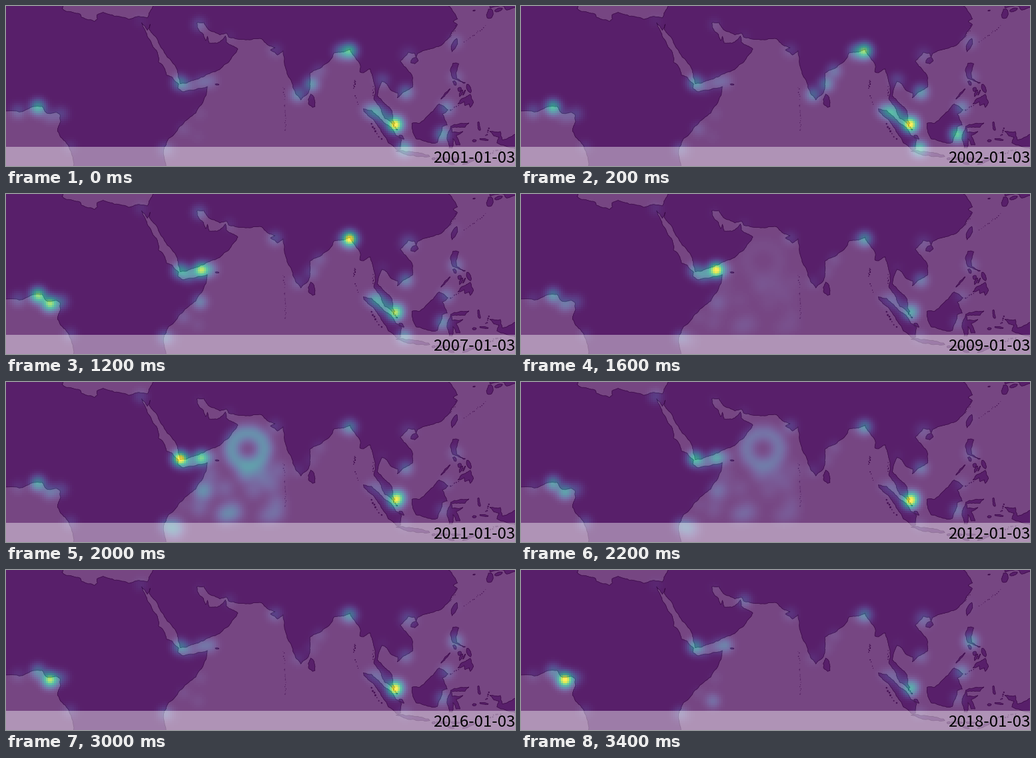
These frames come from a looping animation (764x242 px, 3600 ms). A matplotlib script:

```python
import numpy as np
import matplotlib.pyplot as plt
from matplotlib.animation import FuncAnimation
from matplotlib.patches import Polygon, Rectangle

W, H, DPI = 764, 242, 100
CELL = 3
START, YEARS = 2001, 18
OVERLAY = 0.733
LAND = (143 / 255, 113 / 255, 165 / 255)
rng = np.random.default_rng(4)

fig = plt.figure(figsize=(W / DPI, H / DPI), dpi=DPI, facecolor="white")
ax = fig.add_axes([0, 0, 1, 1])
ax.axis("off")


def px(size):
    return 72 / DPI * size


def project(lonlat):
    return np.column_stack([30.5 + 5.31 * lonlat[:, 0], 185.5 - 5.35 * lonlat[:, 1]])


def roughen(p, depth=3):
    """Split each side and push the midpoints sideways for a natural coast."""
    for _ in range(depth):
        q = np.roll(p, -1, axis=0)
        d = q - p
        push = np.column_stack([-d[:, 1], d[:, 0]]) * rng.uniform(-0.1, 0.1, (len(p), 1))
        mid = (p + q) / 2 + np.clip(push, -0.15, 0.15)
        p = np.stack([p, mid], axis=1).reshape(-1, 2)
    return p


def land(*coords):
    """Fill a coastline given as lon, lat, lon, lat, ..."""
    shape = project(roughen(np.reshape(coords, (-1, 2)).astype(float)))
    ax.add_patch(Polygon(shape, facecolor=LAND, edgecolor=(0, 0, 0, 0.85),
                         linewidth=px(0.75), joinstyle="round", zorder=1))


def isle(lon, lat, length, width, angle):
    """An oval island with a ragged shore."""
    a = np.linspace(0, 2 * np.pi, 10, endpoint=False)
    r = rng.uniform(0.8, 1.15, a.size) / 2
    z = (length * r * np.cos(a) + 1j * width * r * np.sin(a)) * np.exp(1j * np.radians(angle))
    land(*np.column_stack([lon + z.real, lat + z.imag]).ravel())


def islets(lon0, lat0, lon1, lat1, count, size=1.2):
    """Scatter tiny islands along a line."""
    p = np.linspace([lon0, lat0], [lon1, lat1], count)
    p = project(p + rng.normal(0, 0.15, p.shape))
    ax.scatter(p[:, 0], p[:, 1], s=px(size) ** 2 * rng.uniform(0.4, 1.6, count),
               color=(0.1, 0.05, 0.15, 0.8), linewidths=0, zorder=1)


# Mainland coast, clockwise from north-west Africa
mediterranean = [
    -8, 40, 10.7, 40, 10.4, 34.6, 10.1, 34, 11.2, 33.2, 13.2, 32.9, 15.2, 32.4,
    15.6, 31.5, 18, 30.8, 19.2, 30.3, 20.1, 31, 20, 32.2, 21.7, 32.9, 23.1, 32.4,
    25, 31.8, 29, 30.9, 31, 31.6, 34.2, 31.3, 35.5, 33.9, 36, 40]
east_asia = [
    119.3, 40, 119.2, 34.8, 120.9, 32.8, 121.9, 31, 120.7, 30.3, 121.8, 29.5,
    119.7, 26, 117.8, 24, 115, 22.7, 113.6, 22.4, 110.6, 21.3, 110.2, 20.3,
    109.7, 21.4, 108, 21.6, 105.7, 19, 107.8, 16.6, 109.2, 14.5, 109.2, 11.8,
    106.8, 10.4, 104.9, 8.7, 105, 10.1, 103.3, 10.7, 101.9, 12.7, 100.5, 13.4]
malay = [
    99.9, 12, 99.2, 9.3, 100.3, 8.3, 101.6, 6.9, 103.4, 4.9, 103.5, 2.6, 104.2, 1.4,
    103.5, 1.3, 101.3, 2.9, 100.3, 5.5, 98.3, 8.2, 98.7, 10.2, 98.1, 13.8,
    97.2, 16.9, 95.4, 15.8, 94.3, 16, 94.4, 18, 92.1, 21.2, 91.5, 22.5]
india = [
    88.9, 21.6, 87, 21.4, 86.4, 20, 82.3, 16.8, 80.2, 15.7, 80.2, 13.3, 79.8, 10.3,
    78.2, 8.9, 77.6, 8.1, 76.4, 9.5, 74.5, 14.2, 73, 18, 72.6, 22, 71, 20.8,
    69, 22.2, 70.3, 22.9, 68.2, 23.7, 66.5, 25.4]
gulf = [
    62, 25.1, 57.3, 25.8, 56.6, 27, 54.7, 26.5, 51.5, 28, 50.2, 30, 48.2, 29.9,
    48.4, 28.5, 50.1, 26.6, 50.7, 24.9, 51.2, 26.1, 51.7, 24.2, 54, 24.2,
    56.3, 26.2, 56.6, 24.4, 59.8, 22.5]
red_sea = [
    57.8, 19.6, 55.3, 17.3, 52.2, 15.8, 48.5, 14, 45, 12.8, 43.5, 12.7, 42.7, 16.5,
    39, 21.5, 37.2, 24.9, 34.7, 28.1, 35, 29.5, 34.2, 27.8, 32.6, 29.9, 33.6, 27.8,
    35.5, 23.8, 37.1, 21.5, 37.4, 18.8, 38.5, 18, 39.7, 15.1, 41.2, 14.6]
africa = [
    43.1, 12.6, 42.8, 11.5, 44.3, 10.4, 48, 11.1, 51.2, 11.9, 50.8, 9.4, 47.9, 4.4,
    44, 1, 40.2, -2.8, 38.8, -6, 40, -14, 13.7, -14, 13.2, -8.5, 11.8, -4.6,
    8.8, -.7, 9.7, 2, 9.5, 4, 8.5, 4.6, 6, 4.3, 4.4, 6.3, 1.2, 6, -2, 4.7, -8, 5]
land(*mediterranean, *east_asia, *malay, *india, *gulf, *red_sea, *africa)

# Sumatra, Borneo, Sulawesi, Luzon, Mindanao, New Guinea, Honshu
land(95.3, 5.6, 97.5, 5.2, 100, 2.8, 103, .5, 104.5, -1.9, 106, -3, 105.8, -5.8,
     104.6, -5.9, 102.3, -4, 100.4, -1, 98.7, 1.7, 95.4, 4.9)
land(109, 1.5, 111.3, 1.6, 113, 3.2, 116.7, 7, 119.2, 5.3, 117.6, 4.1, 119, 1,
     117.6, .6, 116.2, -3.9, 114.6, -4.1, 110.2, -2.9, 109, .2)
land(120, .7, 121, 1.2, 125.1, 1.6, 124, .4, 120.2, .3, 120.3, -1, 123.4, -.8,
     121.5, -2, 122.6, -4.6, 121.5, -4.6, 120.6, -2.8, 120.4, -5.5, 119.5, -5.5,
     118.9, -2.7)
land(120.6, 18.5, 122.2, 18.4, 121.5, 15.8, 121.7, 14.2, 124.1, 13, 123.6, 12.8,
     121.7, 13.8, 120.5, 14.2, 119.9, 16.2)
land(122, 7, 123.4, 8.6, 125.5, 9.7, 126.4, 7.3, 125.5, 6, 125.2, 7, 124, 6.5,
     123.8, 7.6)
land(131, -.8, 134, -.8, 134.6, -3.2, 138, -1.6, 142, -2.6, 142, -9, 139, -8,
     138, -5.5, 133, -4, 133.6, -2.4, 132.2, -2.1)
land(131, 37, 131, 34.2, 135, 34.6, 135.8, 33.5, 138.8, 34.7, 139, 37)

isle(80.7, 7.8, 3.9, 2, 100)        # Sri Lanka
isle(53.9, 12.5, 1.1, .4, 0)        # Socotra
isle(121, 23.6, 3.6, 1.4, 70)       # Taiwan
isle(109.7, 19.2, 2.2, 1.7, 30)     # Hainan
isle(109.8, -7.2, 9.4, 1.2, -9)     # Java
isle(131, 32.4, 2.8, 1.9, 80)       # Kyushu
isle(133.5, 33.6, 2.2, 1, 20)       # Shikoku
isle(126.6, 33.4, .7, .3, 10)       # Jeju
isle(125, 11.4, 2.5, 1.1, 115)      # Samar
isle(122.5, 11.1, 1.3, 1, 50)       # Panay
isle(122.9, 10, 1.9, .7, 65)        # Negros
isle(123.8, 10.3, 1.7, .3, 65)      # Cebu
isle(118.5, 9.8, 3.8, .5, 48)       # Palawan
isle(121.1, 12.9, 1.5, .8, 120)     # Mindoro
isle(127.9, .7, 2.8, .7, 100)       # Halmahera
isle(129.4, -3.1, 2.8, .5, -8)      # Seram
isle(126.6, -3.4, 1.1, .7, 0)       # Buru
isle(106, -2.3, 1.8, .7, -40)       # Bangka
isle(125.3, -9.2, 4, .8, 25)        # Timor
isle(120, -9.8, 1.8, .6, -15)       # Sumba
for lon, length in [(115.1, 1), (116.3, .8), (118, 2), (121.3, 2.8)]:
    isle(lon, -8.5, length, .6, 0)

islets(73.2, 7, 73.2, -.6, 14)
islets(72.6, 11.8, 73, 8.4, 6)
islets(92.9, 13.5, 92.6, 11.6, 8, 1.8)
islets(92.8, 9.2, 93.8, 7, 4, 1.5)
islets(97.5, 1.5, 100.2, -3, 7, 2.4)
islets(123.9, 24.4, 129.8, 29, 12)
islets(103.7, 1, 104.8, -.3, 8, 1.8)
islets(119.8, 5.2, 122, 6.6, 7, 1.6)
islets(127.5, -7.6, 134, -6, 12, 1.8)
islets(130.5, 0, 130, -2, 5, 2.2)
islets(121.5, 29.4, 120, 26, 8)
islets(98, 11.8, 98.2, 9.5, 6, 1.6)

# Hot spots: each has a steady level plus swells around some years
gx, gy = np.meshgrid(np.arange(CELL / 2, W, CELL), np.arange(CELL / 2, H, CELL))
years = START + np.arange(YEARS)[:, None, None]
field = np.zeros((YEARS, *gx.shape))


def bell(t, center, width):
    return np.exp(-((t - center) / width) ** 2 / 2)


def spot(x, y, base, *swells, spread=8):
    """Add a hot spot; a swell is (height, peak year, width in years)."""
    level = base + sum(h * bell(years, year, width) for h, year, width in swells)
    field[:] += level * np.exp(-((gx - x) ** 2 + (gy - y) ** 2) / (2 * spread ** 2))


# Straits and islands of South-East Asia: busy early, again around 2013
spot(584, 180, .28, (.65, 2001.5, 3), (.72, 2014, 2.2))
spot(589, 174, .1, (.35, 2011, .7))
spot(556, 160, .1, (.4, 2003.5, 2.2), (.25, 2005, .7))
spot(568, 169, .1, (.3, 2003.5, 2.2))
spot(545, 158, .04, (.2, 2002.5, 1.8))
spot(655, 194, .08, (.85, 2003.5, 1.6), (.18, 2014, 1.5))
spot(598, 216, .06, (.6, 2003.2, 2.2))
spot(600, 130, .12, (.22, 2002, 1), (.1, 2010, 2))
spot(661, 154, .06, (.18, 2002, 3), (.18, 2018, 1.5))
spot(675, 108, .1, (.24, 2018, 1.5))
spot(604, 74, .08, (.1, 2005, 1), (.08, 2018, 2), spread=9)
spot(565, 112, .02, (.13, 2001.5, 1))
spot(674, 54, .02, (.1, 2001.5, 1))

# Bay of Bengal and India
spot(516, 68, .3, (.58, 2004, 2.5))
spot(502, 69, .03, (.25, 2001.6, 1))
spot(458, 118, .04, (.3, 2000.5, 2.5), (.12, 2005, 1))
spot(438, 134, .05, (.23, 2001.7, 2))
spot(470, 98, .05, (.14, 2002, .6))
spot(404, 67, .08, (.13, 2005, 1), (.12, 2014, 1.2))

# Gulf of Aden and East Africa: the peak of 2008 to 2011
spot(261, 116, .26, (.66, 2011, .7), (.14, 2018, 1), (.1, 2001.5, 1))
spot(293, 115, .12, (.85, 2009.3, 1.7))
spot(274, 122, .1, (.2, 2009.3, 1.5))
spot(307, 114, .1, (.14, 2005, 1), (.12, 2018, 1))
spot(291, 163, .03, (.34, 2005.5, 1))
spot(288, 198, .02, (.14, 2018, .8))
spot(266, 186, .03, (.12, 2004, 1.6))
spot(239, 217, .13)
spot(252, 221, .01, (.3, 2011, 1), spread=10)
spot(290, 28, .02, (.33, 2005, 1.2), (.12, 2001, .5))
spot(335, 46, .03, (.13, 2018, 1))
spot(202, 22, .03, (.08, 2012, 2))

# Gulf of Guinea: steady, then the busiest of all
spot(48, 153, .25, (.36, 2003.5, 3), (.15, 2011, 1))
spot(66, 166, .1, (.35, 2013, 1.2), (.9, 2018, 2), (.4, 2007.5, .9))
spot(83, 163, .12)
spot(18, 159, .06, (.1, 2002, 3))
spot(96, 213, .06, (.08, 2013, 1.5))

# Open sea: a ring in the Arabian Sea and a loose scatter south of it
for a in np.linspace(0, 2 * np.pi, 10, endpoint=False):
    spot(363 + 26 * np.cos(a), 101 + 25 * np.sin(a), 0, (.21, 2011, .9), spread=9)
for x, y in rng.uniform([290, 130], [410, 205], (20, 2)):
    spot(x, y, 0, (.1, 2010.7, 1), spread=10)

field = np.clip(1.04 * field / field.max(axis=(1, 2), keepdims=True), 0, 1)

heat = ax.imshow(field[0], cmap="viridis", vmin=0, vmax=1, alpha=OVERLAY,
                 interpolation="nearest", aspect="auto", zorder=2,
                 extent=(0, gx.shape[1] * CELL, gx.shape[0] * CELL, 0))
ax.add_patch(Rectangle((0, 213), W, H - 213, facecolor="white", alpha=0.42,
                       linewidth=0, zorder=3))
date = ax.text(764, 237, "", ha="right", va="baseline", color="black", zorder=4,
               family="Noto Sans CJK JP", fontsize=px(24))
ax.set_xlim(0, W)
ax.set_ylim(H, 0)


def draw(i):
    heat.set_data(field[i])
    date.set_text(f"{START + i}-01-03")
    return heat, date


anim = FuncAnimation(fig, draw, frames=YEARS, interval=200, repeat=True, repeat_delay=0)
plt.show()
```
